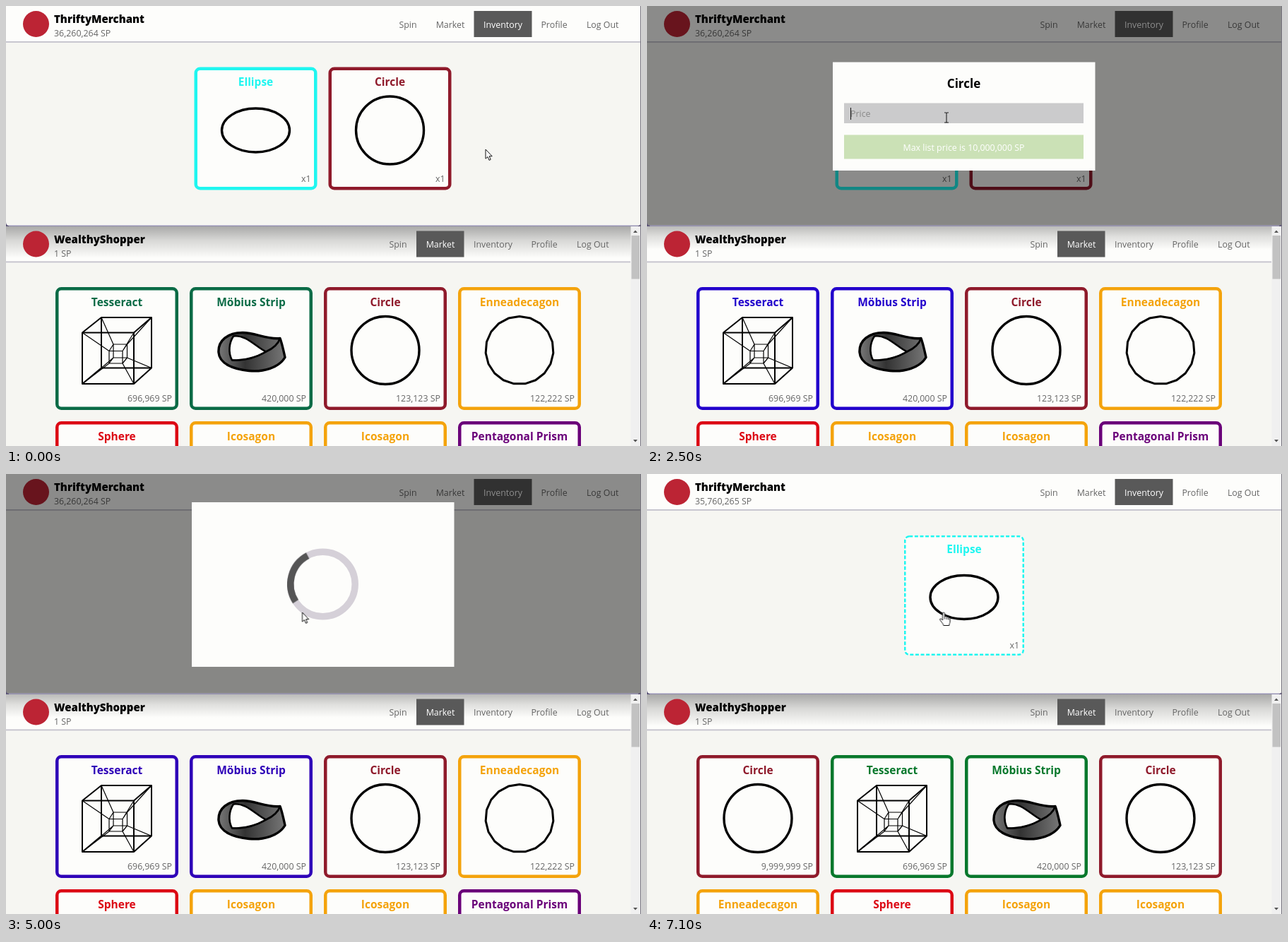
These frames come from a looping animation (899 px wide and 623 px high, 7.2 s). An HTML page:

```html
<!DOCTYPE html>
<html lang="en">
<head>
<meta charset="utf-8">
<title>Shape market</title>
<style>
html, body { margin: 0; width: 100%; height: 100%; overflow: hidden; background: #f6f6f2; }
svg { display: block; width: 899px; height: 623px; }
text { font: 12.4px "Open Sans", "Noto Sans", sans-serif; fill: #666; }
.title { font-size: 15.5px; font-weight: 700; fill: currentColor; }
.name { font-size: 15px; font-weight: 800; fill: #000; }
.light { fill: #fff; }
.mid { text-anchor: middle; }
.end { text-anchor: end; }
.frame { fill: #fdfdfb; stroke: currentColor; }
.ink { fill: none; stroke: #000; stroke-width: 3.4; stroke-linejoin: round; }
.thin { stroke-width: 1.2; }
.rainbow { animation: rainbow 7.2s linear infinite; }
#pointer { animation: move 7.2s ease-in-out infinite; }
#spin { transform-origin: 448.5px 156px; animation: spin 1s linear infinite; }
@keyframes rainbow {
  0%     { color: #0a6b46; }
  4%     { color: #4f8a10; }
  8%     { color: #e8a800; }
  12.5%  { color: #e2060f; }
  22%    { color: #8a0090; }
  34.72% { color: #2200cc; }
  42%    { color: #0c7c9c; }
  50%    { color: #0a7a28; }
  55%    { color: #d8b000; }
  60%    { color: #e2060f; }
  65%    { color: #80009a; }
  69.44% { color: #2e00b8; }
  78%    { color: #1090e0; }
  86.11% { color: #1ef5e6; }
  98.61% { color: #08782c; }
  100%   { color: #0a6b46; }
}
@keyframes move {
  0%, 4%         { transform: translate(679px, 203px); }
  12.5%          { transform: translate(632px, 200px); }
  18%, 22.5%     { transform: translate(585px, 188px); }
  32%, 54%       { transform: translate(424px, 158px); }
  62%, 100%      { transform: translate(419.5px, 196px); }
}
@keyframes spin { to { transform: rotate(360deg); } }
</style>
</head>
<body>
<svg id="stage" viewBox="0 0 899 623"></svg>
<script>
const LOOP = 7200, OPEN = 1600, SEND = 4900, DONE = 5400, RELIST = 5700;
const KEY_START = 2900, KEY_STEP = 130, DIGITS = 7;
const CYAN = '#1ff6f0', MAROON = '#8f1a2b', ORANGE = '#f4a30c', RED = '#dc0814', PURPLE = '#6a0079';

const text = (x, y, s, cls = '') => `<text x="${x}" y="${y}" class="${cls}">${s}</text>`;
const rect = (x, y, w, h, fill, extra = '') =>
  `<rect x="${x}" y="${y}" width="${w}" height="${h}" fill="${fill}" ${extra}/>`;
const path = (d, cls = 'ink', extra = '') => `<path d="${d}" class="${cls}" ${extra}/>`;
// A group shown only inside the given time spans
const during = (spans, body) => `<g data-on="${spans.join(' ')}">${body}</g>`;

const ngon = n => Array.from({ length: n }, (_, i) => {
  const a = i / n * 2 * Math.PI - Math.PI / 2;
  return `${(48 * Math.cos(a)).toFixed(2)},${(48 * Math.sin(a)).toFixed(2)}`;
}).join(' ');

function tesseract() {
  const corners = (x, y, w, h) => [[x, y], [x + w, y], [x + w, y + h], [x, y + h]];
  const loop = c => 'M' + c.join('L') + 'Z';
  const join = (a, b) => a.map((p, i) => `M${p}L${b[i]}`).join('');
  const front = corners(-49, -25, 73, 72.5), back = corners(-22, -46.5, 71, 71.5);
  const front2 = corners(-11, 1, 19, 17.5), back2 = corners(-5, -8.5, 19.5, 19);
  return path(loop(front) + loop(back) + join(front, back), 'ink', 'style="stroke-width:2"') +
    path(loop(front2) + loop(back2) + join(front2, back2) + join(front, front2) + join(back, back2), 'ink thin');
}

const shapes = {
  'Circle': '<circle r="48" class="ink"/>',
  'Ellipse': '<ellipse rx="48" ry="31" class="ink"/>',
  'Enneadecagon': `<polygon points="${ngon(19)}" class="ink" style="stroke-width:3"/>`,
  'Tesseract': tesseract(),
  'Möbius Strip':
    path('M-46 3C-47-14-33-25-12-25C6-25 22-15 41-17C44-9 46 1 48 10C39 25 17 31-3 29C-25 27-45 19-46 3Z', 'ink', 'style="fill:url(#band)"') +
    path('M-25-20C-31-11-33 3-27 14C-12 14 6 11 21 2C8-4-8-23-25-20Z', 'ink', 'style="fill:#fdfdfb;stroke-width:2.6"') +
    path('M21 2C30-2 38-8 41-17M-27 14C-14 15 4 12 21 2', 'ink', 'style="stroke-width:2.6"')
};

function card(x, y, name, color, note, hover) {
  const size = hover ? 170 : 174, b = hover ? 2.5 : 4.5, mid = size / 2, lift = hover ? 2 : 0;
  return `<g transform="translate(${x} ${y})" ${color ? `style="color:${color}"` : 'class="rainbow"'}>` +
    `<rect x="${b / 2}" y="${b / 2}" width="${size - b}" height="${size - b}" rx="6" class="frame" ` +
    `stroke-width="${b}" ${hover ? 'stroke-dasharray="5 2.6"' : ''}/>` +
    text(mid, 26.7 - lift * .8, name, 'title mid') +
    `<g transform="translate(${mid} ${89.5 - lift})">${shapes[name] || ''}</g>` +
    text(165 - lift, 162 - lift, note, 'end') + '</g>';
}

function header(y, width, name, balance, tabs, active) {
  const [x, w] = active;
  return `<circle cx="42.5" cy="${y + 25.5}" r="18.5" fill="#bc2434"/>` +
    text(68, y + 24.3, name, 'name') + balance +
    rect(x, y + 7, w, 37, '#595959') +
    ['Spin', 'Market', 'Inventory', 'Profile', 'Log Out'].map((s, i) =>
      text(tabs[i], y + 30.7, s, 'mid' + (tabs[i] > x && tabs[i] < x + w ? ' light' : ''))).join('') +
    rect(0, y + 50, width, 1.8, '#c3c1cc');
}

function market(cards) {
  return cards.map(([name, color, price], i) =>
    card(70 + i % 4 * 190, 398 + (i > 3) * 190, name, color, price ? price + ' SP' : '')).join('');
}

const listed = [
  ['Tesseract', '', '696,969'], ['Möbius Strip', '', '420,000'], ['Circle', MAROON, '123,123'],
  ['Enneadecagon', ORANGE, '122,222'], ['Sphere', RED], ['Icosagon', ORANGE], ['Icosagon', ORANGE]
];
const older = [...listed, ['Pentagonal Prism', PURPLE]];
const newer = [['Circle', MAROON, '9,999,999'], ...listed];

const seller =
  rect(0, 0, 899, 311, '#f6f6f2') + rect(0, 0, 899, 50, '#fdfdfb') +
  header(0, 899, 'ThriftyMerchant',
    during([0, DONE], text(68, 43, '36,260,264 SP')) + during([DONE, LOOP], text(68, 43, '35,760,265 SP')),
    [569, 629, 703.5, 776, 844.7], [662.5, 82]) +
  during([0, 1000, OPEN, DONE], card(266.5, 86.5, 'Ellipse', CYAN, 'x1') + card(456.5, 86.5, 'Circle', MAROON, 'x1')) +
  during([1000, OPEN], card(268.5, 86.5, 'Ellipse', CYAN, 'x1') + card(458.5, 86.5, 'Circle', MAROON, 'x1', true)) +
  during([DONE, LOOP], card(364, 87, 'Ellipse', CYAN, 'x1', true));

const form =
  rect(263, 79.5, 371.5, 153.5, '#fdfdfb') +
  text(448.5, 115.5, 'Circle', 'title mid big') +
  rect(279, 137.5, 339, 28.5, '#cbcbcc') +
  '<text id="price" x="288" y="157"></text>' + rect(288, 144, 1, 17, '#111', 'id="caret"') +
  rect(279, 182.5, 339, 34, '', 'id="button"') +
  '<text id="label" x="448.5" y="205" class="mid light"></text>';

const loader =
  rect(263, 40, 371.5, 233, '#fdfdfb') +
  '<circle cx="448.5" cy="156" r="45.7" fill="none" stroke="#d5d0d8" stroke-width="9.5"/>' +
  '<g id="spin"><path d="M426.9 115.7A45.7 45.7 0 0 0 410.2 180.9" fill="none" stroke="#555" stroke-width="9.5"/></g>';

const buyer =
  rect(0, 311, 899, 312, '#f6f6f2') + rect(0, 311, 885, 51, '#fdfdfb') +
  during([0, OPEN, DONE, LOOP], rect(0, 311, 885, 46, 'url(#shade)')) +
  during([OPEN, DONE], rect(0, 311, 885, 34, 'url(#shade)', 'opacity=".8"')) +
  header(311.5, 884, 'WealthyShopper', text(68, 354.7, '1 SP'),
    [555, 615, 689.5, 762, 830.8], [581, 67.5]) +
  during([0, RELIST], market(older)) + during([RELIST, LOOP], market(newer)) +
  rect(884.5, 312, 13.5, 311, '#f0f0f0') + rect(885.5, 325, 11.5, 61.5, '#c2c2c2') +
  path('M888 321l3-3.5l3 3.5zM888 614l3 3.5l3-3.5z', '', 'fill="#555"');

const arrow = path('M0 0V13.2L3 10.5L5 15.4L7.2 14.4L5.2 9.7H9.2Z', '', 'fill="#fff" stroke="#111"');
const beam = path('M-3-7H-1Q0-7 0-6Q0-7 1-7H3M0-6V6M-3 7H-1Q0 7 0 6Q0 7 1 7H3', '', 'fill="none" stroke="#222" stroke-width="1.1"');
const hand = path('M-1 1.5C-1-.5 2-.5 2 1.5V6.2C3 5 4.8 5.4 5 6.8C6 5.8 7.4 6.4 7.5 7.8C8.6 7 9.6 7.8 9.6 9V13C9.6 15 8.3 16 8.3 18.5H.3C.3 16-4 12.5-5 9.8C-4.5 8.5-3 8.6-2.2 9.7L-1 11ZM2 6.2V9.5M5 6.8V10M7.5 7.8V10.5',
  '', 'fill="#fff" stroke="#111"');

const stage = document.getElementById('stage');
stage.innerHTML =
  `<defs>
    <linearGradient id="shade" x2="0" y2="1">
      <stop stop-opacity=".34"/><stop offset=".45" stop-opacity=".15"/><stop offset="1" stop-opacity="0"/>
    </linearGradient>
    <linearGradient id="band"><stop stop-color="#777"/><stop offset=".4" stop-color="#333"/><stop offset="1" stop-color="#777"/></linearGradient>
  </defs>` +
  buyer + seller +
  during([OPEN, DONE], rect(0, 0, 899, 311, '#000', 'opacity=".45"')) +
  path('M0 306Q0 311 5 311H894Q899 311 899 306V312H0Z', '', 'fill="#5b5378"') +
  rect(4, 310.5, 891, 1.2, '#aaa5c6') + rect(898, 0, 1, 623, '#77747f') +
  during([OPEN, SEND], form) + during([SEND, DONE], loader) +
  '<g id="pointer">' +
  during([0, 1000, OPEN, 2150, SEND, DONE], arrow) +
  during([2150, 4250], beam) +
  during([1000, OPEN, 4250, SEND, DONE, LOOP], hand) + '</g>';

const [price, caret, button, label, pointer] =
  ['price', 'caret', 'button', 'label', 'pointer'].map(id => document.getElementById(id));
const big = stage.querySelector('.big');
big.style.cssText = 'font-size:17px;fill:#000';
const timed = [...stage.querySelectorAll('[data-on]')].map(el => [el, el.dataset.on.split(' ').map(Number)]);
const clock = pointer.getAnimations()[0];

function typed(t) {
  const n = Math.max(0, Math.min(DIGITS, Math.floor((t - KEY_START) / KEY_STEP) + 1));
  const fee = Math.floor((10 ** n - 1) * .05).toLocaleString('en-US');
  price.textContent = n ? '9'.repeat(n) : 'Price';
  price.style.fill = n ? '#333' : '#888';
  label.textContent = n ? `List (-${fee} SP)` : 'Max list price is 10,000,000 SP';
  button.setAttribute('fill', n ? '#5a9f10' : '#cbe1b6');
  caret.setAttribute('x', 288 + (n ? price.getComputedTextLength() : 0));
  const since = n < DIGITS ? (n ? 0 : t - 2300) : t - KEY_START - DIGITS * KEY_STEP;
  caret.style.opacity = since % 1060 < 530 ? 1 : 0;
}

function draw() {
  const t = (clock ? clock.currentTime || 0 : performance.now()) % LOOP;
  for (const [el, spans] of timed) {
    const on = spans.some((from, i) => i % 2 === 0 && t >= from && t < spans[i + 1]);
    el.style.display = on ? '' : 'none';
  }
  if (t >= OPEN && t < SEND) typed(t);
  requestAnimationFrame(draw);
}
draw();
</script>
</body>
</html>
```
